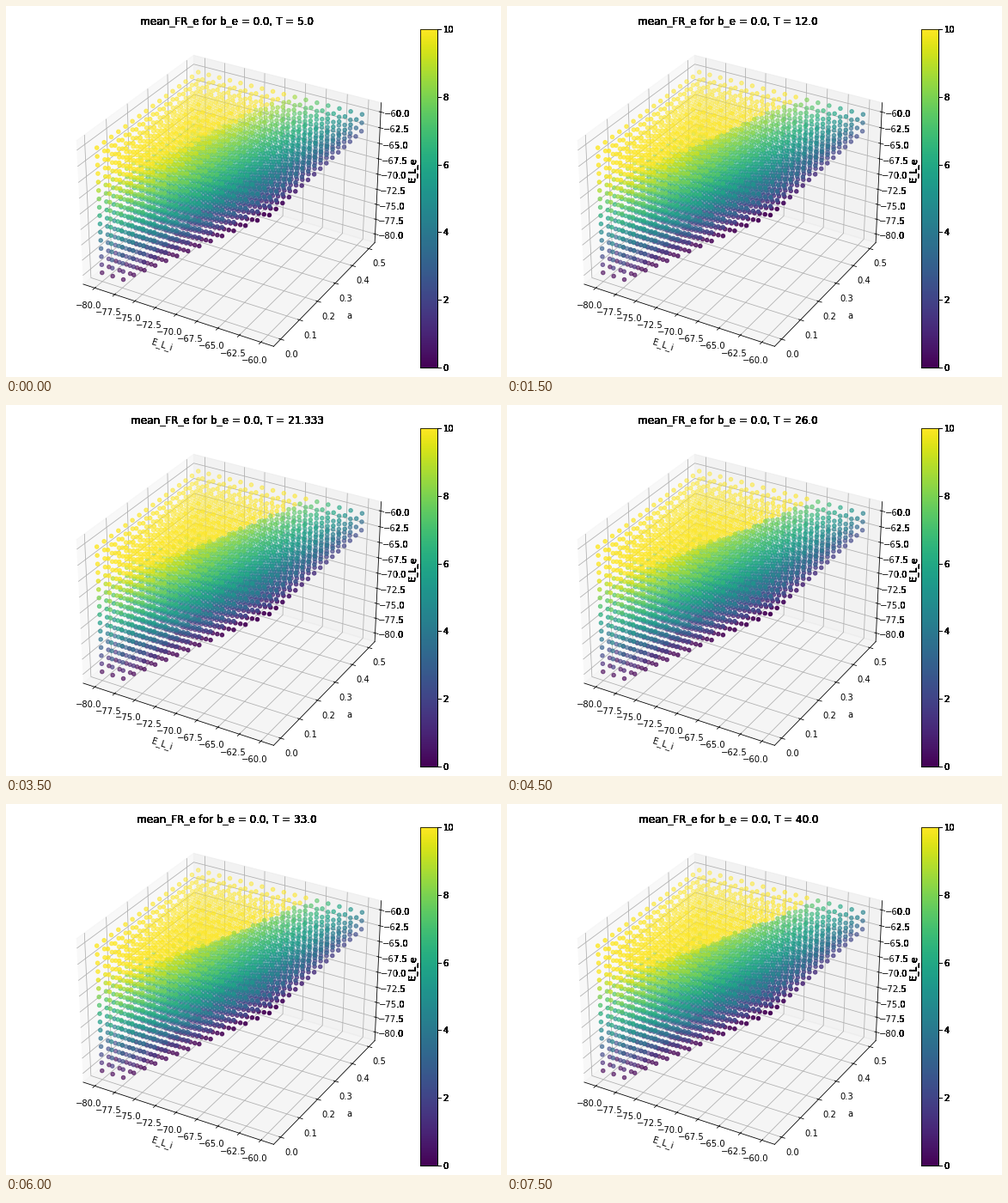
These frames come from a looping animation (576x432 px, 8000 ms). A matplotlib script:

```python
import numpy as np
import matplotlib.pyplot as plt
from matplotlib.animation import FuncAnimation
from matplotlib.artist import Artist
from matplotlib.transforms import Bbox

N = 16
W, H = 576, 432
BOTTOM, SIDE, MIDDLE = 10.8, 394.4, 257.3
temps = np.linspace(5, 40, N)

# Parameter grid, limited to E_L_e not far below E_L_i.
a_i, x_i, z_i = (g.ravel() for g in np.meshgrid(*[np.arange(N)] * 3, indexing="ij"))
keep = z_i >= x_i - 2
a_i, x_i, z_i = a_i[keep], x_i[keep], z_i[keep]


def potential(i):
    return -80 + 20 * i / (N - 1)


def firing_rate(temp):
    a = a_i / (N - 1)
    drive = np.maximum(z_i - x_i + 2 * x_i / (x_i + 1) + 1.2 * a, 0)
    rate = 10 * (drive / 11.5) ** (0.6 + 0.3 / (1 + x_i))
    # Above a threshold that falls with temperature the rate saturates.
    boost = a * (1 + 1.7 * (1 - np.exp(-(temp - 5) / 15)))
    return np.where(rate + boost > 10, 10, rate)


def box(left, bottom, width, height):
    return [left / W, bottom / H, width / W, height / H]


fig = plt.figure(figsize=(W / 72, H / 72), dpi=72)
ax = fig.add_axes(box(MIDDLE - SIDE / 2, BOTTOM, SIDE, SIDE), projection="3d")
points = ax.scatter(potential(x_i), 0.5 * a_i / (N - 1), potential(z_i),
                    c=firing_rate(temps[0]), cmap="viridis", vmin=0, vmax=10)
ax.set_xlabel("E_L_i")
ax.set_ylabel("a")
ax.set_zlabel("E_L_e")
title = fig.text(MIDDLE / W, (BOTTOM + SIDE + 6) / H, "", size=12,
                 ha="center", va="baseline")

cax = fig.add_axes(box(482, BOTTOM, SIDE / 20, SIDE))
bar = plt.cm.ScalarMappable(plt.Normalize(0, 10), "viridis")
fig.colorbar(bar, cax=cax, ticks=range(0, 11, 2))


class Overprint(Artist):
    """Draws the text outside the plot square again, which makes it heavier."""

    zorder = 10

    def draw(self, renderer):
        outside = Bbox([[454, 0], [W, H]])
        labels = [t.label1 for t in ax.zaxis.get_major_ticks()
                  if -80.1 < t.get_loc() < -59.9]
        for _ in range(10):
            title.draw(renderer)
            cax.draw(renderer)
            for text in labels + [ax.zaxis.label]:
                text.set_clip_box(outside)
                text.set_clip_on(True)
                text.draw(renderer)
                text.set_clip_on(False)


fig.add_artist(Overprint())


def update(i):
    points.set_array(firing_rate(temps[i]))
    title.set_text(f"mean_FR_e for b_e = 0.0, T = {round(float(temps[i]), 3)}")
    return points, title


anim = FuncAnimation(fig, update, frames=N, interval=500, repeat=True,
                     repeat_delay=0, blit=False)
plt.show()
```
